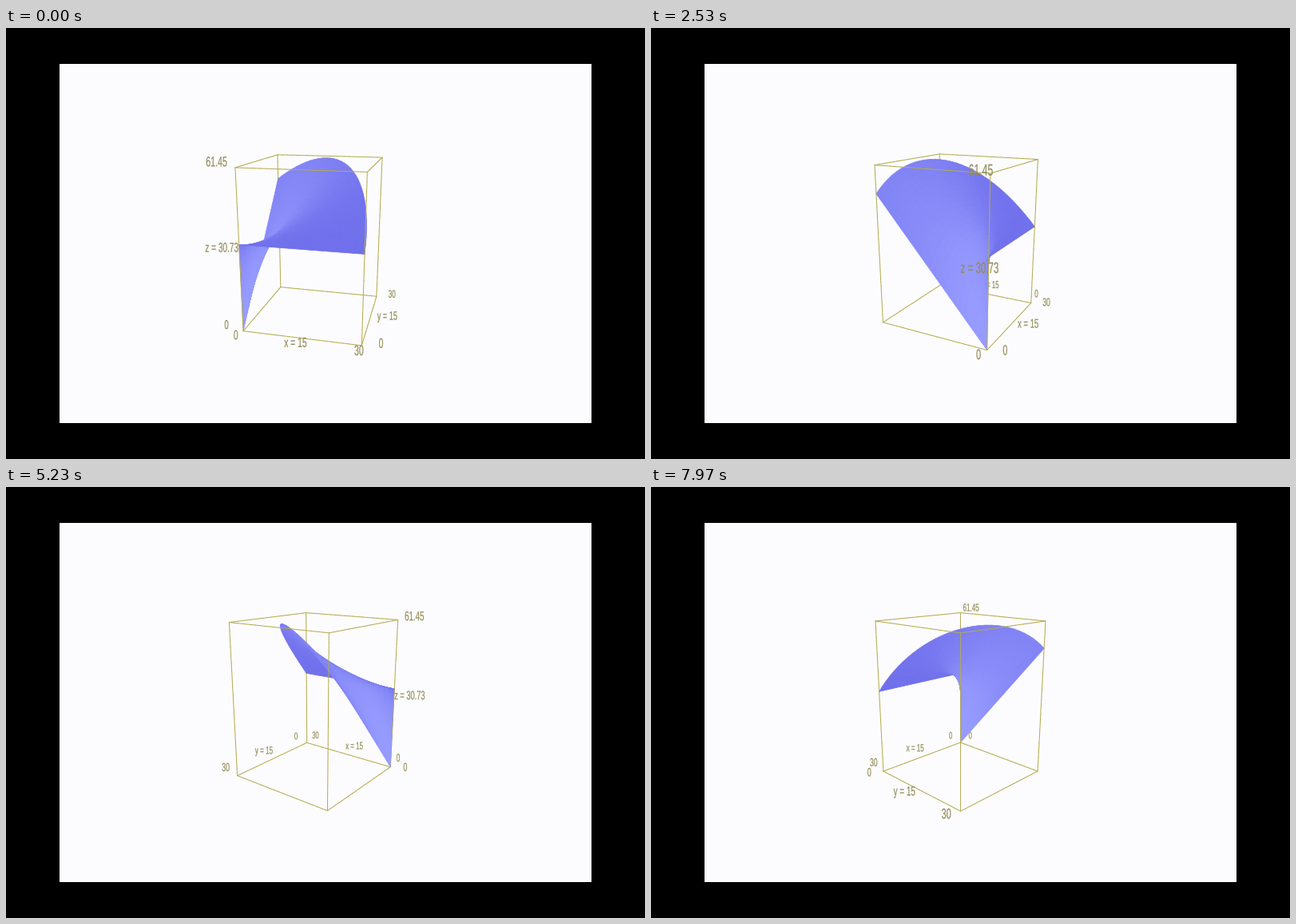
These frames come from a looping animation (800 by 540 pixels, 8000 ms). A matplotlib script:

```python
import numpy as np
import matplotlib.pyplot as plt
from matplotlib.animation import FuncAnimation
from matplotlib.collections import PathCollection
from matplotlib.patches import Rectangle
from matplotlib.path import Path
from matplotlib.textpath import TextPath

W, H, DPI = 800, 540, 100
FRAMES, INTERVAL = 250, 32
START, SPEED = 14.0, -30.0          # degrees, degrees per second

# Camera: pitch, distance, focal length and optical centre in pixels
PITCH = np.radians(16.4)
DIST, FOCAL = 7.93, 568.0
CX, CY = 387.5, 266.6

# Box is 2 x 2 x 2*TALL in world units; values run to 30, 30 and Z_MAX
TALL, Z_MAX = 1.366, 61.45
A, B = 34.09, 51.13                 # z = A cos(t) + B r sin(t)

LINE = (0.71, 0.67, 0.31, 1)
INK = (0.58, 0.55, 0.34, 1)
DARK = np.array([112, 112, 236]) / 255
LIGHT = np.array([150, 155, 255]) / 255
EM, CONDENSE = 0.215, 0.6           # letter size in world units, narrow face
GAP, LIFT = 0.3, 0.083              # label distance from its edge


def project(pts, psi):
    """World points to pixels and depth for a view turned by psi."""
    x, y, z = np.moveaxis(np.asarray(pts, float), -1, 0)
    u = x * np.cos(psi) + y * np.sin(psi)
    w = x * np.sin(psi) - y * np.cos(psi)
    depth = DIST - w * np.cos(PITCH) - z * np.sin(PITCH)
    up = z * np.cos(PITCH) - w * np.sin(PITCH)
    k = FOCAL / depth
    return np.stack([CX + k * u, CY - k * up], -1), depth


def make_surface(nr=22, nt=32):
    r, t = np.meshgrid(np.linspace(0, 1, nr + 1),
                       np.linspace(0, np.pi / 2, nt + 1), indexing="ij")
    z = A * np.cos(t) + B * r * np.sin(t)
    p = np.stack([2 * r * np.cos(t) - 1, 2 * r * np.sin(t) - 1,
                  (2 * z / Z_MAX - 1) * TALL], -1)
    quads = np.stack([p[:-1, :-1], p[1:, :-1], p[1:, 1:], p[:-1, 1:]], 2)
    quads = quads.reshape(-1, 4, 3)
    n = np.cross(quads[:, 2] - quads[:, 0], quads[:, 3] - quads[:, 1])
    shade = np.abs(n[:, 0]) / np.linalg.norm(n, axis=1)
    rgb = DARK + shade[:, None] * (LIGHT - DARK)
    return quads, np.column_stack([rgb, np.ones(len(rgb))])


def make_edges(parts=20):
    s = np.linspace(-1, 1, parts + 1)
    segs = []
    for axis in range(3):
        for a in (-1, 1):
            for b in (-1, 1):
                line = np.empty((parts + 1, 3))
                line[:, axis] = s
                line[:, (axis + 1) % 3] = a
                line[:, (axis + 2) % 3] = b
                line[:, 2] *= TALL
                segs.append(np.stack([line[:-1], line[1:]], 1))
    return np.concatenate(segs)


def make_labels():
    out = 1 + GAP
    spots = []
    for text, s in (("0", -1), ("x = 15", 0), ("30", 1)):
        spots.append((text, (s, -out, -TALL)))
    for text, s in (("0", -1), ("y = 15", 0), ("30", 1)):
        spots.append((text, (out, s, -TALL)))
    for text, s in (("0", -1), ("z = 30.73", 0), ("61.45", 1)):
        spots.append((text, (-out, -1, s * TALL)))
    glyphs, places = [], []
    for text, (x, y, z) in spots:
        path = TextPath((0, 0), text, size=1, prop={"family": "Liberation Sans"})
        v = path.vertices.copy()
        box = path.get_extents()
        v -= [(box.x0 + box.x1) / 2, 0.345]
        glyphs.append((v * [EM * CONDENSE, -EM], path.codes))
        places.append((x, y, z + LIFT))
    return glyphs, np.array(places)


quads, quad_rgba = make_surface()
edges = make_edges()
glyphs, places = make_labels()

counts = [len(quads), len(edges), len(glyphs)]
clear = (0, 0, 0, 0)
faces = np.concatenate([quad_rgba, np.tile(clear, (counts[1], 1)),
                        np.tile(INK, (counts[2], 1))])
strokes = np.concatenate([quad_rgba, np.tile(LINE, (counts[1], 1)),
                          np.tile(INK, (counts[2], 1))])
widths = np.repeat([0.5, 0.72, 0.12], counts)

fig = plt.figure(figsize=(W / DPI, H / DPI), dpi=DPI, facecolor="black")
ax = fig.add_axes([0, 0, 1, 1])
ax.set_xlim(0, W)
ax.set_ylim(H, 0)
ax.axis("off")
ax.add_patch(Rectangle((67, 45), 666, 449.5, fc="#fcfcfe", ec="none"))

scene = PathCollection([], capstyle="round", joinstyle="round")
scene.set_transform(ax.transData)
scene.set_snap(False)
ax.add_collection(scene, autolim=False)


def update(i):
    psi = np.radians(START + SPEED * i * INTERVAL / 1000)
    q, qd = project(quads, psi)
    e, ed = project(edges, psi)
    g, gd = project(places, psi)
    paths = [Path(np.vstack([p, p[:1]]), closed=True) for p in q]
    paths += [Path(p) for p in e]
    paths += [Path(c + v * FOCAL / d, codes)
              for c, d, (v, codes) in zip(g, gd, glyphs)]
    # Far parts first; edges win over the sheet they touch
    depth = np.concatenate([qd.mean(1), ed.mean(1) - 0.03, gd])
    order = np.argsort(-depth)
    scene.set_paths([paths[j] for j in order])
    scene.set_facecolor(faces[order])
    scene.set_edgecolor(strokes[order])
    scene.set_linewidth(widths[order])
    return (scene,)


anim = FuncAnimation(fig, update, frames=FRAMES, interval=INTERVAL,
                     init_func=lambda: update(0), repeat=True,
                     repeat_delay=0, blit=False)
plt.show()
```
